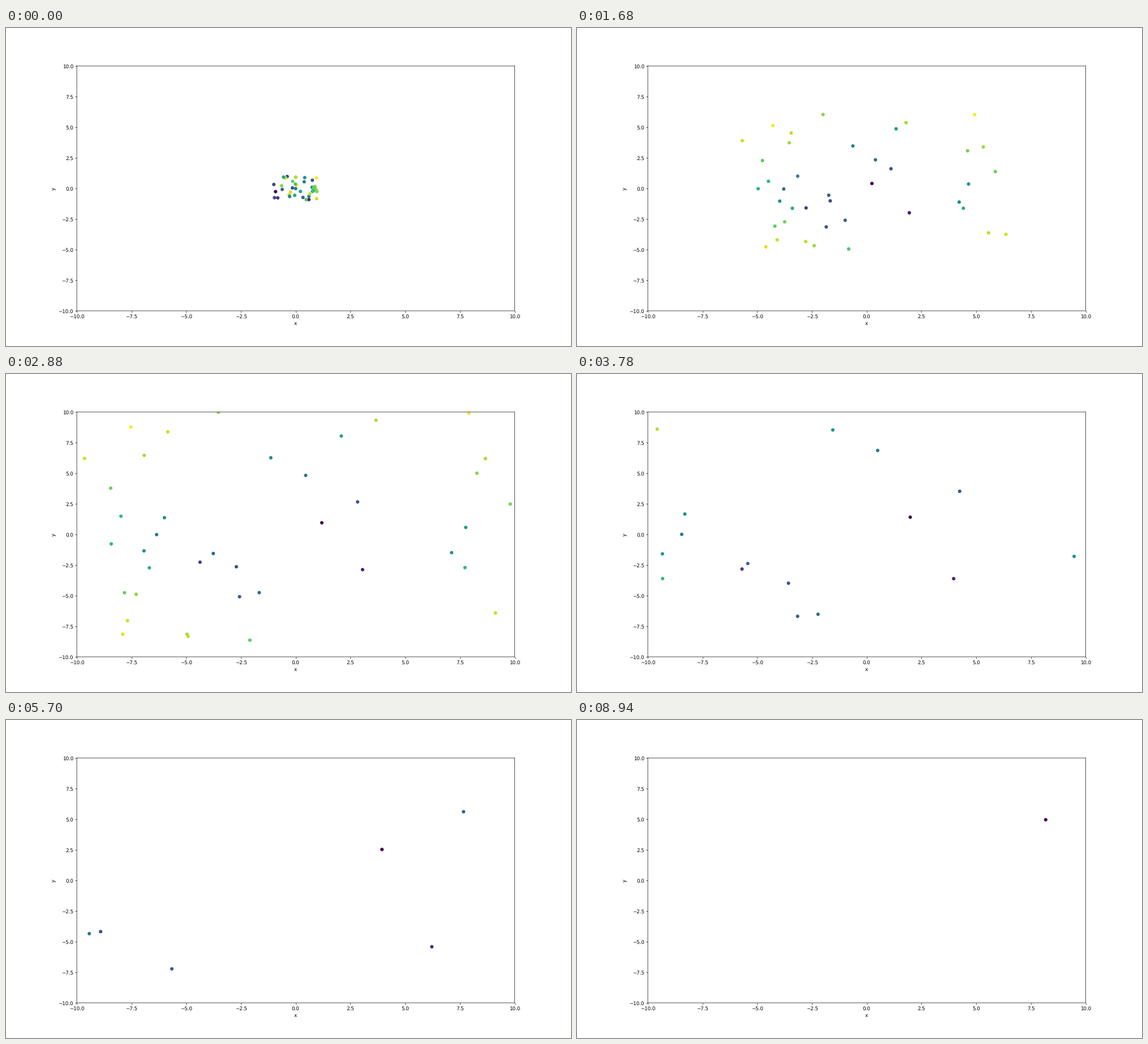
Recreate the animation shown at these times as a matplotlib script. Size 998 px wide and 561 px high, loop 9 s.

```python
import numpy as np
import matplotlib.pyplot as plt
from matplotlib.animation import FuncAnimation

W, H, DPI = 998, 561, 62.375
FRAMES, STEP_MS = 150, 60
GROWTH = 0.1045     # speed growth rate per second
TOP_SPEED = 4.8     # speed at which growth stops
SWARM = 32

# The slow particles that stay in view longest: x, y, vx, vy.
SLOW = np.array([
    (-0.92, -0.26, 0.631, 0.362), (0.60, -0.91, 0.735, -0.590),
    (-1.00, 0.32, 1.156, 0.706), (-0.39, 0.97, -0.701, -1.090),
    (-0.82, -0.77, -1.069, -0.451), (-0.97, -0.76, -0.483, -1.309),
    (-0.15, 0.04, -0.460, -1.454), (0.76, 0.67, -1.373, -0.676),
])


def make_swarm(rng):
    """Random starts in a square; headings crowd to the left, diagonals are fastest."""
    pos = rng.uniform(-1, 1, (SWARM, 2))
    turn = np.linspace(0, 1, SWARM)
    angle = np.radians(-38 + 289 * turn + 30 * np.sin(np.pi * turn) ** 2)
    speed = 1.6 + 2 * np.abs(np.sin(2 * angle)) + rng.uniform(-0.4, 0.4, SWARM)
    vel = speed[:, None] * np.column_stack([np.cos(angle), np.sin(angle)])
    return np.hstack([pos, vel])


particles = np.vstack([SLOW, make_swarm(np.random.default_rng(4))])
start, vel = particles[:, :2], particles[:, 2:]
speed0 = np.hypot(*vel.T)
heading = vel / speed0[:, None]
ratio = speed0 / np.sqrt(TOP_SPEED ** 2 - speed0 ** 2)


def state(t):
    """Positions and speeds, from v' = GROWTH * v * (1 - v^2 / TOP_SPEED^2)."""
    r = ratio * np.exp(GROWTH * t)
    run = TOP_SPEED / GROWTH * (np.arcsinh(r) - np.arcsinh(ratio))
    speed = TOP_SPEED * r / np.sqrt(1 + r * r)
    return start + heading * run[:, None], speed


plt.rcParams["text.hinting"] = "none"
fig, ax = plt.subplots(figsize=((W + 1e-6) / DPI, (H + 1e-6) / DPI), dpi=DPI)
fig.subplots_adjust(left=200.5 / 1600, right=1440.5 / 1600,
                    bottom=99.5 / 900, top=792.5 / 900)
for spine in ax.spines.values():
    spine.set_snap(False)

pos, speed = state(0)
dots = ax.scatter(*pos.T, c=speed, cmap="viridis")
ax.set(xlim=(-10, 10), ylim=(-10, 10), xlabel="x", ylabel="y")


def update(i):
    pos, speed = state(i * STEP_MS / 1000)
    dots.set_offsets(pos)
    dots.set_array(speed)
    dots.set_clim(speed.min(), speed.max())
    return dots,


anim = FuncAnimation(fig, update, frames=FRAMES, interval=STEP_MS,
                     repeat=True, repeat_delay=0)
plt.show()
```
